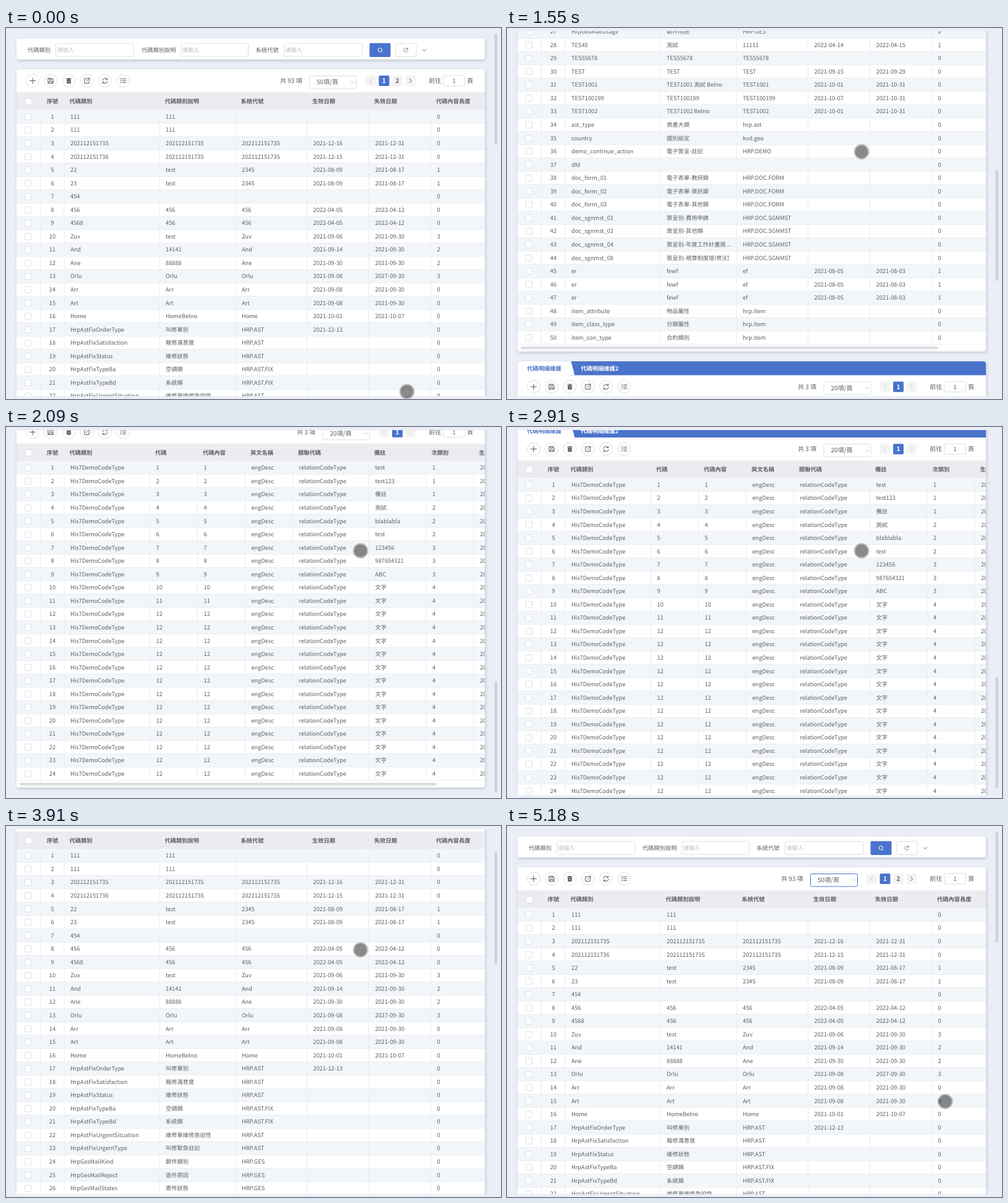
An HTML page for the animation above (6000 ms loop, 800 by 601 pixels).

```html
<!DOCTYPE html>
<html lang="zh-Hant">
<head>
<meta charset="utf-8">
<title>代碼維護</title>
<style>
  html, body { margin: 0; width: 100%; height: 100%; overflow: hidden; background: #ebeef6; }
  svg { display: block; position: absolute; left: 0; top: 0; }
  text {
    font: 9.24px "Noto Sans CJK TC", "Noto Sans CJK JP", "Noto Sans CJK SC", "Noto Sans CJK", sans-serif;
    fill: #5c5e63; white-space: pre; text-rendering: geometricPrecision;
  }
  .big { font-size: 10px; }
  .bold { font-weight: 700; }
  .mid { text-anchor: middle; }
  .hint { fill: #b9bdc6; }
  .white { fill: #fff; }
  .blue { fill: #4a74cb; }
  .card { fill: #fff; filter: drop-shadow(1px 2px 2.5px rgba(40, 50, 80, .22)); }
  .box { fill: #fff; stroke: #dcdfe6; }
  .pager { fill: #f4f4f5; }
  .icon { fill: none; stroke: #55575c; stroke-width: 1; stroke-linecap: round; stroke-linejoin: round; }
  .lines { stroke: #e9ecf2; stroke-width: 1; fill: none; }
</style>
</head>
<body>
<svg id="stage" width="800" height="601" viewBox="0 0 800 601">
  <defs>
    <clipPath id="view"><rect y="5" width="800" height="591.5"/></clipPath>
    <clipPath id="inner"><rect x="17" width="757" height="2000"/></clipPath>
  </defs>
  <g clip-path="url(#view)"><g id="page"></g></g>
  <rect id="thumb" x="789.5" y="9" width="4.5" height="180" rx="2.2" fill="#cfd2da"/>
  <g id="pointer">
    <circle r="10.5" fill="#000" fill-opacity=".46"/>
    <circle r="11.4" fill="none" stroke="#777" stroke-opacity=".45" stroke-width="2"/>
  </g>
</svg>
<script>
const BLUE = '#4a74cb', GREY = '#dcdfe6', ROW = 21.55, LEFT = 17, RIGHT = 774;

// code | description | system | start | end | length
const CODES = `111|111
111|111
202112151735|202112151735|202112151735|2021-12-16|2021-12-31
202112151736|202112151735|202112151735|2021-12-15|2021-12-31
22|test|2345|2021-08-09|2021-08-17|1
23|test|2345|2021-08-09|2021-08-17|1
454
456|456|456|2022-04-05|2022-04-12
4568|456|456|2022-04-05|2022-04-12
Zuv|test|Zuv|2021-09-06|2021-09-30|3
And|14141|And|2021-09-14|2021-09-30|2
Ane|88888|Ane|2021-09-30|2021-09-30|2
Orlu|Orlu|Orlu|2021-09-08|2027-09-30|3
Arr|Arr|Arr|2021-09-08|2021-09-30
Art|Art|Art|2021-09-08|2021-09-30
Home|HomeBelno|Home|2021-10-01|2021-10-07
HrpAstFixOrderType|叫修單別|HRP.AST|2021-12-13
HrpAstFixSatisfaction|報修滿意度|HRP.AST
HrpAstFixStatus|維修狀態|HRP.AST
HrpAstFixTypeBa|空調類|HRP.AST.FIX
HrpAstFixTypeBd|系統類|HRP.AST.FIX
HrpAstFixUrgentSituation|維修單維修急迫性|HRP.AST
HrpAstFixUrgentType|叫修緊急註記|HRP.AST
HrpGesMailKind|郵件類別|HRP.GES
HrpGesMailReject|退件原因|HRP.GES
HrpGesMailStates|寄件狀態|HRP.GES
HrpGesMailUsage|郵件用途|HRP.GES
TES45|測試|11111|2022-04-14|2022-04-15|1
TES55678|TES55678|TES55678
TEST|TEST|TEST|2021-09-15|2021-09-29
TEST1001|TEST1001 測試 Belno|TEST1001|2021-10-01|2021-10-31
TEST100199|TEST100199|TEST100199|2021-10-07|2021-10-31
TEST1002|TEST1002 Belno|TEST1002|2021-10-01|2021-10-31
ast_type|資產大類|hrp.ast
country|國別設定|kvd.geo
demo_continue_action|電子簽呈-註記|HRP.DEMO
dfd
doc_form_01|電子表單-教研類|HRP.DOC.FORM
doc_form_02|電子表單-資訊類|HRP.DOC.FORM
doc_form_03|電子表單-其他類|HRP.DOC.FORM
doc_sgnmst_01|簽呈別-費用申請|HRP.DOC.SGNMST
doc_sgnmst_02|簽呈別-其他類|HRP.DOC.SGNMST
doc_sgnmst_04|簽呈別-年度工作計畫提...|HRP.DOC.SGNMST
doc_sgnmst_08|簽呈別-規章制度增(修)訂|HRP.DOC.SGNMST
er|fewf|ef|2021-08-05|2021-08-03|1
er|fewf|ef|2021-08-05|2021-08-03|1
er|fewf|ef|2021-08-05|2021-08-03|1
item_attribute|物品屬性|hrp.item
item_class_type|分類屬性|hrp.item
item_con_type|合約類別|hrp.item`.split('\n').map(line => {
  const cells = line.split('|');
  cells[5] = cells[5] || '0';
  return cells;
});

const NOTES = ['test', 'test123', '備註', '測試', 'blablabla', 'test', '123456', '987654321', 'ABC'];
const DETAILS = Array.from({ length: 24 }, (_, i) => {
  const code = Math.min(i + 1, 12);
  return ['His7DemoCodeType', code, code, 'engDesc', 'relationCodeType',
    NOTES[i] || '文字', Math.min(Math.floor(i / 3) + 1, 4), '2021-12-16'];
});

const ICONS = {
  plus: 'M-4.5 0H4.5M0-4.5V4.5',
  save: 'M-4-4H2.5L4-2.5V4H-4ZM-2-4V-1.5H1.5V-4M-2.5 4V1H2.5V4',
  open: 'M0-3.5H-4V4H3.5V0M1-4.2H4.2V-1M4-4L-1 1',
  sync: 'M-4-.5A4 4 0 0 1 3.2-2.5M4 .5A4 4 0 0 1-3.2 2.5M3.6-4.4V-2.2H1.4M-3.6 4.4V2.2H-1.4',
  list: 'M-.8-3H4.5M-.8 0H4.5M-.8 3H4.5M-4.6-3.2l.8.8 1.4-1.6M-4.6-.2l.8.8 1.4-1.6M-4.4 3h1.4',
  reset: 'M3-1.4A3.2 3.2 0 1 0 3.1 1.2M3.4-3.4V-1.3H1.3',
  find: 'M2.9 0A3.1 3.1 0 1 1-3.3 0A3.1 3.1 0 1 1 2.9 0M2.1 2.2L3.8 3.9',
  down: 'M-3-1.5L0 1.5L3-1.5',
  prev: 'M1.5-3.4L-1.7 0L1.5 3.4',
  next: 'M-1.5-3.4L1.7 0L-1.5 3.4'
};

const esc = s => String(s).replace(/&/g, '&amp;').replace(/</g, '&lt;');
const text = (x, cy, s, cls = '') => `<text x="${x}" y="${cy + 3.4}" class="${cls}">${esc(s)}</text>`;
const rect = (x, y, w, h, extra = '') => `<rect x="${x}" y="${y}" width="${w}" height="${h}" ${extra}/>`;
const box = (x, y, w, h, extra = '') => rect(x, y, w, h, `rx="2" class="box" ${extra}`);
const icon = (name, x, y, color = '#55575c', width = 1) =>
  `<path class="icon" transform="translate(${x} ${y})" d="${ICONS[name]}" style="stroke:${color};stroke-width:${width}"/>`;
const check = (x, y) => box(x - 5.2, y - 5.2, 10.4, 10.4);

function trash(x, y) {
  return `<g transform="translate(${x} ${y})">
    <path fill="#4c4e53" d="M-4-3.7H4V-2.6H-4ZM-1.5-4.6H1.5V-3.7H-1.5ZM-3.2-2H3.2V4.3H-3.2Z"/>
    <path stroke="#fff" stroke-width=".9" d="M-1.2 0L1.2 2.4M1.2 0L-1.2 2.4"/></g>`;
}

function searchBar() {
  const fields = [[35, '代碼類別', 80.5, 126], [219, '代碼類別說明', 283, 108.5], [403.5, '系統代號', 449.5, 126.5]];
  return rect(LEFT, 17, RIGHT - LEFT, 34, 'rx="4" class="card"')
    + fields.map(([x, label, bx, w]) =>
      text(x, 35.7, label) + box(bx, 25, w, 21) + text(bx + 1.7, 35.7, '请输入', 'hint')).join('')
    + rect(587.5, 24.5, 34, 22.5, 'rx="2" class="blue"') + icon('find', 604.5, 35.5, '#fff')
    + box(629.5, 25, 33.5, 21.5) + icon('reset', 646, 35.7, '#777', .9)
    + icon('down', 676, 36, BLUE);
}

function toolbar(y, total, totalX, size, shift, pages, id) {
  let out = ['plus', 'save', 'trash', 'open', 'sync', 'list'].map((name, i) => {
    const x = 43 + i * 29.25;
    return `<circle cx="${x}" cy="${y}" r="10.4" class="box"/>` + (name === 'trash' ? trash(x, y) : icon(name, x, y));
  }).join('');
  out += text(totalX, y, `共 ${total} 項`, 'big');
  out += box(490.5 + shift, y - 8, 76, 20.5, `id="${id}"`);
  out += text(502 + shift, y + 2, size + '項/頁', 'big') + icon('down', 560.5 + shift, y + 2.5, '#c0c4cc');
  const pager = (x, cls) => rect(x, y - 8.5, 17, 17, `rx="2" class="${cls}"`);
  const first = 581 + shift;
  out += pager(first, 'pager') + icon('prev', first + 8.5, y, '#c0c4cc');
  for (let p = 1; p <= pages; p++) {
    const x = first + p * 21.5;
    out += pager(x, p === 1 ? 'blue' : 'pager') + text(x + 8.5, y + .2, p, 'big bold mid' + (p === 1 ? ' white' : ''));
  }
  out += pager(645.3, 'pager') + icon('next', 653.8, y, pages > 1 ? '#55575c' : '#c0c4cc');
  out += text(683.2, y, '前往', 'big') + box(706.5, y - 8.5, 35, 17) + text(724, y, '1', 'mid') + text(745, y, '頁', 'big');
  return out;
}

// cols holds the left line of each data column
function table(headY, cols, heads, rows) {
  const top = headY + 13.7, bottom = top + rows.length * ROW;
  let out = rect(LEFT, headY - 14.7, RIGHT - LEFT, 28.4, 'fill="#ebebf0"')
    + check(36.5, headY + .3) + text(75, headY, '序號', 'bold mid')
    + heads.map((h, i) => text(cols[i] + 8.5, headY, h, 'bold')).join('');
  let lines = '';
  rows.forEach((cells, i) => {
    const y = top + i * ROW, cy = y + ROW / 2;
    if (i % 2 === 0) out += rect(LEFT, y, RIGHT - LEFT, ROW, 'fill="#f3f6f9"');
    lines += `M${LEFT} ${y + ROW}H${RIGHT}`;
    out += check(35.5, cy + .3) + text(75, cy, i + 1, 'mid')
      + cells.map((c, j) => c === undefined || c === '' ? '' : text(cols[j] + 10, cy, c)).join('');
  });
  [55.5, ...cols].forEach(x => lines += `M${x} ${top}V${bottom}`);
  return out + `<path class="lines" d="${lines}"/>`
    + rect(22, bottom + 3.8, 674, 4.6, 'rx="2.3" fill="#dcdde0"');
}

function tabs(y) {
  const h = 22.5;
  return `<path class="blue" d="M100 ${y}H${RIGHT - 4}q4 0 4 4V${y + h}H100Z"/>
    <path fill="#fff" d="M90 ${y}H103.5L109.5 ${y + h}H90Z"/>`
    + text(32.3, y + 11.7, '代碼明細維護', 'bold blue') + text(119.3, y + 11.7, '代碼明細維護2', 'bold white');
}

const page = document.getElementById('page');
page.innerHTML = searchBar()
  + rect(LEFT, 67, RIGHT - LEFT, 1155, 'rx="4" class="card"')
  + toolbar(85.5, 93, 443, 50, 0, 2, 'size')
  + table(119, [94, 248, 371, 486.5, 586.5, 686.5],
    ['代碼類別', '代碼類別說明', '系統代號', '生效日期', '失效日期', '代碼內容長度'], CODES)
  + rect(LEFT, 1238, RIGHT - LEFT, 617, 'rx="4" class="card"')
  + tabs(1238)
  + toolbar(1279.2, 3, 470, 20, 21.5, 1, 'size2')
  + '<g clip-path="url(#inner)">'
  + table(1312.5, [94, 232.5, 309.5, 386.5, 463.5, 586.5, 679, 756],
    ['代碼類別', '代碼', '代碼內容', '英文名稱', '關聯代碼', '備註', '次類別', '生效日期'], DETAILS)
  + '</g>';

const thumb = document.getElementById('thumb');
const pointer = document.getElementById('pointer');
const size = document.getElementById('size');

const LOOP = 6000, TICK = 1000 / 11;

// Wheel bursts: first tick, then the scroll offset on each tick
const BURSTS = [
  [0, 0],
  [7, 15, 110, 190, 284, 345, 440, 560, 650, 690],
  [17, 698, 800, 930, 1060, 1082, 1200, 1271],
  [32, 1243.5, 1020, 897],
  [36, 870, 650, 523],
  [40, 300, 149],
  [43, 95.5, 15, 0]
];

// Pointer: tick, x, y
const MOVES = [
  [0, 648, 589], [1, 604, 350], [2, 573, 200.5],
  [49, 592, 238], [50, 652, 352], [51, 692, 422],
  [54, 701, 436], [55, 707.5, 445.5], [57, 708.3, 446.3]
];

const latest = (steps, tick) => steps.filter(s => s[0] <= tick).pop();

function scrollAt(tick) {
  const burst = latest(BURSTS, tick), last = burst.length - 1;
  const i = Math.min(tick - burst[0] + 1, last);
  return { y: burst[i], moving: i < last };
}

function draw(ms) {
  const tick = Math.floor((ms % LOOP + 5) / TICK) % 66;
  const now = scrollAt(tick);
  // The scrollbar trails the page while it moves
  const lag = now.moving ? .2 * (now.y - scrollAt(tick - 1).y) : 0;
  page.setAttribute('transform', `translate(0 ${-now.y})`);
  thumb.setAttribute('y', 9 + .317 * (now.y - lag));
  const [, x, y] = latest(MOVES, tick);
  pointer.setAttribute('transform', `translate(${x} ${y})`);
  size.style.stroke = tick === 0 ? GREY : tick === 1 ? '#93a9d6' : BLUE;
}

const start = performance.now();
function loop() {
  draw(performance.now() - start);
  requestAnimationFrame(loop);
}
loop();
</script>
</body>
</html>
```
